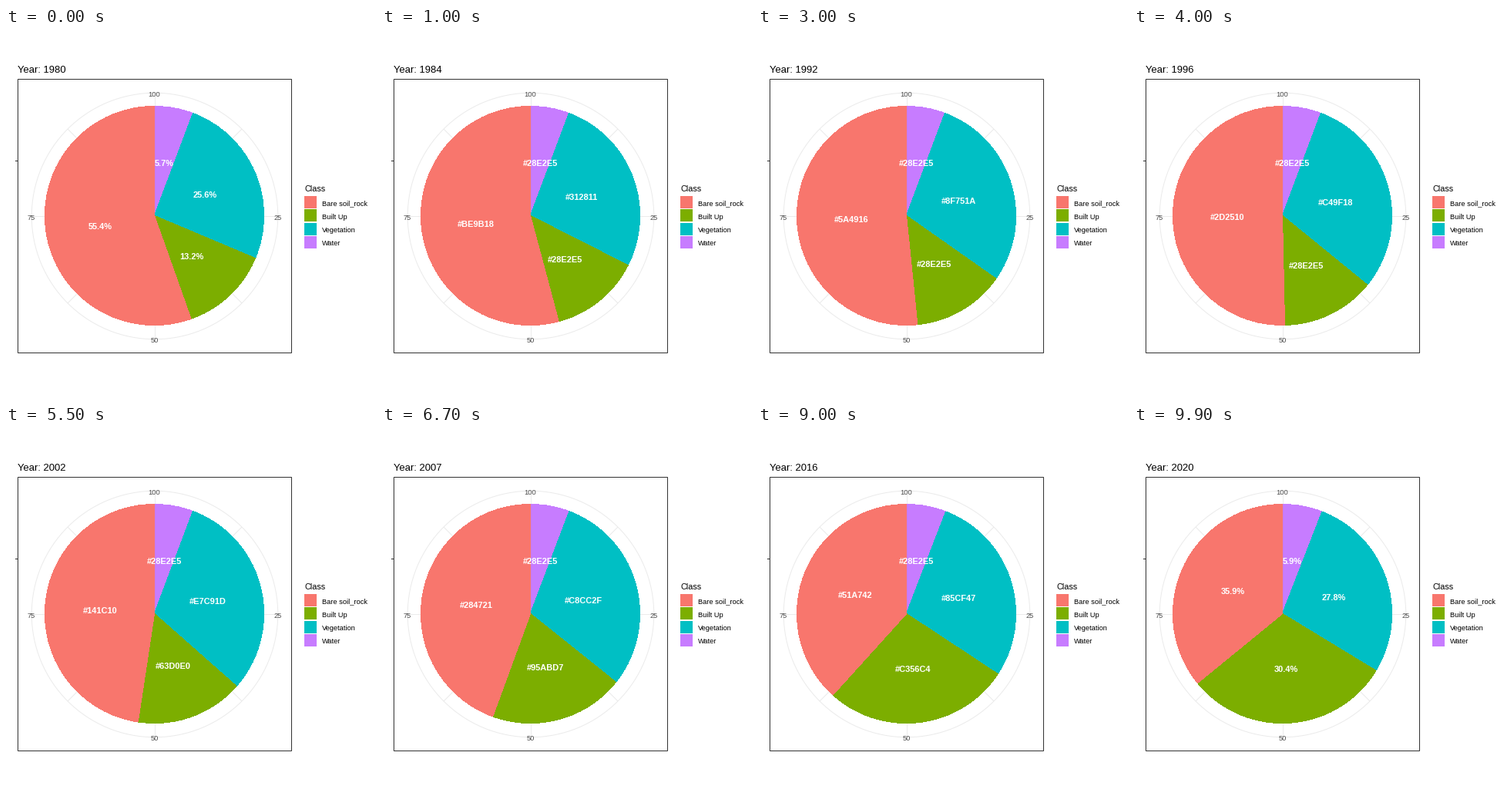
Animation of 480x480 px, one loop 10 s. Source, as a matplotlib script:

```python
import numpy as np
import matplotlib.pyplot as plt
from matplotlib.animation import FuncAnimation
from matplotlib.patches import Circle, Rectangle, Wedge

plt.rcParams["font.family"] = "Liberation Sans"

SIZE, FRAMES, INTERVAL = 480, 100, 100
PANEL = 355
GRID_C = (193, 244)
PIE_C = (192.5, 243.5)  # centred on a pixel, as the pie is drawn unsmoothed
R_PIE, R_GRID = 0.4 * PANEL, 0.45 * PANEL
GRID, DARK, AXIS = "#EBEBEB", "#333333", "#4D4D4D"

# Slices run clockwise from the top
CLASSES = ["Water", "Vegetation", "Built Up", "Bare soil_rock"]
FILLS = ["#C77CFF", "#00BFC4", "#7CAE00", "#F8766D"]
KEYS = [0, 49, 99]
SHARES = np.array([
    [5.73, 25.62, 13.22, 55.43],
    [5.70, 31.20, 13.90, 49.20],
    [5.90, 27.80, 30.40, 35.90],
])

# Between key years a label shows the blend of two palette colours,
# each picked by the whole part of its percentage
PALETTE = ["000000", "DF536B", "61D04F", "2297E6",
           "28E2E5", "CD0BBC", "F5C710", "9E9E9E"]
TO_XYZ = np.array([[0.4124564, 0.3575761, 0.1804375],
                   [0.2126729, 0.7151522, 0.0721750],
                   [0.0193339, 0.1191920, 0.9503041]])
WHITE = np.array([0.95047, 1.0, 1.08883])


def to_lab(hexa):
    c = np.array([int(hexa[k:k + 2], 16) for k in (0, 2, 4)]) / 255
    c = np.where(c > 0.04045, ((c + 0.055) / 1.055) ** 2.4, c / 12.92)
    v = TO_XYZ @ c / WHITE
    x, y, z = np.where(v > 0.008856, np.cbrt(v), 7.787 * v + 16 / 116)
    return np.array([116 * y - 16, 500 * (x - y), 200 * (y - z)])


def to_hex(lab):
    y = (lab[0] + 16) / 116
    f = np.array([y + lab[1] / 500, y, y - lab[2] / 200])
    v = np.where(f ** 3 > 0.008856, f ** 3, (f - 16 / 116) / 7.787) * WHITE
    c = np.clip(np.linalg.solve(TO_XYZ, v), 0, 1)
    c = np.where(c > 0.0031308, 1.055 * c ** (1 / 2.4) - 0.055, 12.92 * c)
    return "#" + "".join(f"{int(round(x * 255)):02X}" for x in c)


def blend(a, b, t):
    p, q = (to_lab(PALETTE[(int(v) - 1) % 8]) for v in (a, b))
    return to_hex(p + (q - p) * t)


def state(i):
    """Shares and label strings for one frame."""
    if i in KEYS:
        shares = SHARES[KEYS.index(i)]
        return shares, [f"{v:.1f}%" for v in shares]
    k = 0 if i < KEYS[1] else 1
    t = (i - KEYS[k]) / (KEYS[k + 1] - KEYS[k])
    a, b = SHARES[k], SHARES[k + 1]
    return a + (b - a) * t, [blend(p, q, t) for p, q in zip(a, b)]


def polar(center, pct, r):
    ang = 2 * np.pi * pct / 100
    return center[0] + r * np.sin(ang), center[1] - r * np.cos(ang)


fig = plt.figure(figsize=(SIZE / 72, SIZE / 72), dpi=72, facecolor="white")
ax = fig.add_axes([0, 0, 1, 1])
ax.set_xlim(0, SIZE)
ax.set_ylim(SIZE, 0)
ax.axis("off")


def text(x, y, s, size, color="black", **kw):
    return ax.text(x, y, s, fontsize=size, color=color, va="baseline", **kw)


def line(x, y, color, **kw):
    ax.plot(x, y, color=color, lw=1, zorder=1, solid_capstyle="butt", **kw)


# Panel and polar grid
for pct in np.arange(0, 100, 12.5):
    x, y = polar(GRID_C, pct, R_GRID)
    line([GRID_C[0], x], [GRID_C[1], y], GRID)
ax.add_patch(Circle(GRID_C, R_GRID, fill=False, ec=GRID, lw=1))
ax.add_patch(Rectangle((15.5, 66.5), PANEL, PANEL, fill=False, ec=DARK, lw=1,
                       snap=False))
line([12, 15], [172.5, 172.5], DARK, snap=False)
for pct in (25, 50, 75, 100):
    x, y = polar(PIE_C, pct, R_GRID)
    text(x, y + 5.2, str(pct), 9.2, AXIS, ha="center")

# Legend
text(387, 212, "Class", 10.8)
for k, (name, fill) in enumerate(zip(CLASSES[::-1], FILLS[::-1])):
    ax.add_patch(Rectangle((387, round(218 + 17.28 * k)), 16, 16, fc=fill,
                           lw=0, antialiased=False))
    text(410, 230.4 + 17.28 * k, name, 9.2)

# Moving parts
title = text(15, 58, "", 13)
wedges = [ax.add_patch(Wedge(PIE_C, R_PIE, 0, 1, fc=c, lw=0,
                             antialiased=False, zorder=2)) for c in FILLS]
labels = [text(0, 0, "", 11, "white", weight="bold", ha="center", zorder=4)
          for _ in FILLS]


def update(i):
    shares, names = state(i)
    ends = np.cumsum(shares)
    title.set_text(f"Year: {round(1980 + 40 * i / (FRAMES - 1))}")
    for wedge, label, share, end, name in zip(wedges, labels, shares, ends, names):
        wedge.set_theta1(3.6 * (end - share) - 90)
        wedge.set_theta2(3.6 * end - 90)
        x, y = polar(PIE_C, end - share / 2, R_PIE / 2)
        label.set_position((x, y + 5))
        label.set_text(name)
    return [title, *wedges, *labels]


anim = FuncAnimation(fig, update, frames=FRAMES, interval=INTERVAL,
                     repeat=True, repeat_delay=0)
plt.show()
```
